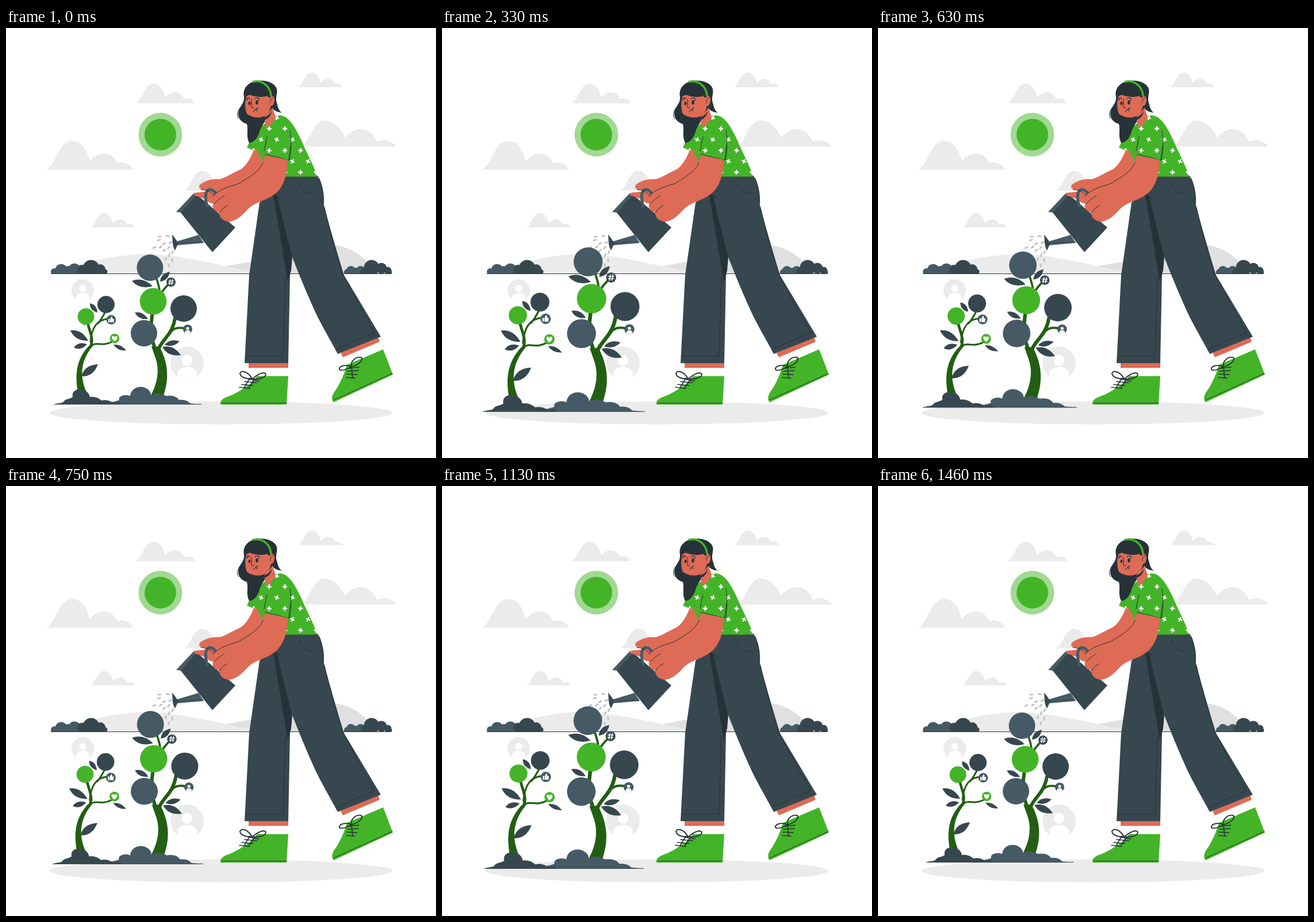
Write an HTML page with a canvas that moves like this. It is 748 px wide and 748 px high and loops after 1.5 s.

```html
<!DOCTYPE html>
<html lang="en">
<head>
<meta charset="utf-8">
<title>Watering the plants</title>
<style>
html, body { margin: 0; width: 100%; height: 100%; overflow: hidden; background: #fff; }
canvas { display: block; width: 748px; height: 748px; }
</style>
</head>
<body>
<canvas id="stage" width="748" height="748"></canvas>
<script>
const ctx = document.getElementById('stage').getContext('2d');
const GREEN = '#43b427', STEM = '#225f12', SLATE = '#37474f', BLUE = '#455a64';
const INK = '#263238', SKIN = '#de6b56', PALE = '#ebebeb', WHITE = '#fff';

function fill(d, color) {
  ctx.fillStyle = color;
  ctx.fill(new Path2D(d));
}
function line(d, color = INK, width = 1) {
  ctx.strokeStyle = color;
  ctx.lineWidth = width;
  ctx.lineCap = ctx.lineJoin = 'round';
  ctx.stroke(new Path2D(d));
}
function oval(x, y, rx, ry, color, angle = 0) {
  ctx.fillStyle = color;
  ctx.beginPath();
  ctx.ellipse(x, y, rx, ry, angle, 0, Math.PI * 2);
  ctx.fill();
}
const disc = (x, y, r, color) => oval(x, y, r, r, color);

function leaf(x1, y1, x2, y2, width) {
  const dx = x2 - x1, dy = y2 - y1, len = Math.hypot(dx, dy);
  const nx = -dy / len * width, ny = dx / len * width;
  const mx = x1 + dx * 0.45, my = y1 + dy * 0.45;
  fill(`M${x1} ${y1}Q${mx + nx} ${my + ny} ${x2} ${y2}Q${mx - nx} ${my - ny} ${x1} ${y1}Z`, SLATE);
}
function avatar(x, y, r, color) {
  ctx.save();
  disc(x, y, r, color);
  ctx.beginPath();
  ctx.arc(x, y, r, 0, Math.PI * 2);
  ctx.clip();
  disc(x, y - r * 0.17, r * 0.32, WHITE);
  oval(x, y + r * 0.65, r * 0.6, r * 0.43, WHITE);
  ctx.restore();
}
function cloud(x, y, scale) {
  ctx.save();
  ctx.translate(x, y);
  ctx.scale(scale, scale);
  fill('M0 0C17 -6 22 -50 46 -50C65 -50 72 -31 77 -15C84 -24 95 -29 104 -28C115 -27 122 -18 125 -11C135 -15 147 -11 152 0Z', PALE);
  ctx.restore();
}
function bush(color, bumps) {
  ctx.save();
  ctx.beginPath();
  ctx.rect(70, 390, 610, 37.5);
  ctx.clip();
  for (const [x, y, r] of bumps) disc(x, y, r, color);
  ctx.restore();
}

function drawBackground() {
  fill('M0 0H748V748H0Z', WHITE);
  cloud(69, 246.5, 1);
  cloud(225, 131, 0.68);
  cloud(508, 103, 0.515);
  cloud(147, 347, 0.507);
  cloud(310, 282.5, 0.68);
  fill('M514 206.5C527 201 533 161 554 161C574 161 585 181 590 191C598 180 609 175 619 176C633 177 641 188 645 198C657 192 671 196 679 206.5Z', PALE);
  disc(268.5, 185.5, 38, '#a1d993');
  disc(268.5, 185.5, 27.5, GREEN);
  fill('M320 427C400 409 455 404 492 391C532 376 564 373 590 382C614 390 629 406 650 427Z', '#e0e0e0');
  fill('M90 427C140 403 210 393 245 393C305 395 350 408 445 427Z', PALE);
  bush(BLUE, [[84, 424, 6], [96, 421, 10.5], [108, 422, 8], [119, 420, 10.5], [130, 424, 8],
    [594, 425, 6], [600, 422, 8], [609, 424, 7], [617, 422, 8], [626, 424, 6]]);
  bush(SLATE, [[132, 420, 8], [148, 418, 14.5], [164, 420, 9], [172, 424, 4.5],
    [623, 423, 6], [636, 417, 13.5], [653, 418, 9.5], [664, 422, 6.5], [668, 425, 3.5]]);
  line('M78 427.5H670');
  oval(374, 669.5, 298, 20, PALE);
  avatar(133.5, 456.5, 19.5, PALE);
  avatar(315, 583, 29, PALE);
}

function drawLegs() {
  fill('M422 580H491V591.5H422Z', SKIN);
  fill('M424 591.5H490V608H424Z', WHITE);
  fill('M491 605.5L488 655H373C372 648 377 644 389 640C404 634 412 627 424 620L437 605.5Z', GREEN);
  line('M376 652.5H488');
  fill('M582 565L647 537L650 546L586 573Z', SKIN);
  fill('M586 573L650 546L655 560L592 588Z', WHITE);
  fill('M593 586L656 559L673 603L570 651C565 646 567 638 574 629C584 613 588 602 593 586Z', GREEN);
  line('M570 647L672 601');

  fill('M484 257H542C551 271 554 289 553 308C560 336 575 387 588 430L652 537L577 567C563 540 545 511 533 483C522 458 508 425 497 396L494 430L491 583H415L423 430L441 304Z', SLATE);
  fill('M464 286L490 441L496 422L498 399C488 361 478 320 472 293Z', INK);
  line('M418 570.5H482L486 435M576 558L641 530L586 430C573 387 560 340 554 312');
  line('M510 267C512 280 524 289 537 287M545 262C550 275 552 288 551 303M466 287L482 299');

  line('M428 610C420 596 408 595 407 601C408 608 419 611 429 610C440 612 452 608 452 602C449 597 438 602 429 610', INK, 1.9);
  line('M406 625L424 627M410 620L430 622M415 615L436 617M422 611L440 614M424 609L414 626M432 611L423 625', INK, 1.7);
  line('M601 589C590 584 578 589 580 594C584 598 594 593 601 589C599 579 609 571 618 573C623 578 612 587 601 589', INK, 1.9);
  line('M592 608L607 609M593 602L611 603M594 597L613 596M595 592L614 590M601 590L603 609', INK, 1.7);
}

const shirt = new Path2D('M468 153C476 151 484 152 490 158C500 166 510 186 518 205C527 225 537 243 541 258.5H484L489 230L448 222V217H440L419 208C428 188 441 173 454 163Z');

function drawShirt() {
  ctx.save();
  ctx.fillStyle = GREEN;
  ctx.fill(shirt);
  ctx.clip(shirt);
  // Staggered plus pattern
  for (let row = 0; row < 6; row++) {
    for (let col = 0; col < 6; col++) {
      ctx.save();
      ctx.translate(403 + col * 27.2 + (row % 2 ? 0.5 : 13.6), 156 + row * 19);
      ctx.rotate(row % 2 ? 0.12 : 0.45);
      line('M-3 0H3M0 -3V3', WHITE, 2.5);
      ctx.restore();
    }
  }
  ctx.restore();
  line('M494 178C497 198 496 215 493 230L448 219M454 189L449 214M492 229L495 204');
}

function drawHead() {
  fill('M414 119C411 105 422 93 438 92C453 90 468 96 471 106C473 115 467 122 472 133C473 140 476 143 478 147C470 146 466 143 463 139L458 152C449 164 442 174 440 184C435 195 430 199 423 200C417 188 422 178 419 167C406 163 402 153 405 143C408 134 415 131 414 119Z', INK);
  line('M416 132C404 138 399 151 405 158M468 128C469 139 473 144 479 147');
  fill('M449 155L464 139L469 155C466 164 460 170 452 173Z', SKIN);
  fill('M448 156C455 154 460 149 462 144C462 151 457 157 450 160Z', INK);
  fill('M418 119C415 130 416 143 419 149C428 157 445 158 453 151C460 145 462 135 460 123L454 118C444 122 431 119 424 116Z', SKIN);
  oval(462, 127, 5, 9, SKIN, 0.15);
  line('M460 130C459 125 462 121 465 121');
  line('M430 93.5C446 90 459 101 461 117', GREEN, 3.6);
  oval(423.5, 131, 2, 3, INK, 0.1);
  oval(436.5, 130, 2.2, 3.2, INK, 0.1);
  line('M418 126L421 124M418 123C420 121 422 121 424 123M433 123C436 121 439 121 441 124M435 127L440 126', INK, 1.3);
  line('M427 124C428 130 427 135 427 138L431 139M431 145C432 142 436 141 438 139M435 142L437 144', INK, 1.1);
}

function drawCan() {
  fill('M303 320L330 288L399 347L359 390Z', SLATE);
  fill('M296 320L327 287L332 290L304 321Z', BLUE);
  fill('M335 360L298 371L297 378L344 374Z', BLUE);
  fill('M289 359L300 374L294 387C289 379 290 370 289 359Z', SLATE);
  line('M298 374L343 372', SLATE, 1);
}

function drawArms() {
  fill('M431 212C425 229 415 242 408 246C395 252 382 260 372 263C356 262 344 267 337 273C334 278 338 281 347 282L367 288L400 276C425 265 443 249 449 232V216Z', SKIN);
  drawCan();
  fill('M326 288C334 284 343 287 350 283L371 288L364 306L354 304L347 298L328 291Z', SKIN);
  line('M350 310C346 297 346 284 353 281C361 280 364 287 370 295', BLUE, 5);
  fill('M448 221L490 229C489 251 486 269 473 284C458 300 435 301 421 315C410 327 400 336 388 337C377 336 371 330 371 321C362 319 357 312 361 305C355 298 359 291 367 287C381 279 397 276 410 267C429 255 440 245 448 221Z', SKIN);
  fill('M437 215L451 217L447 233Z', GREEN);
  line('M447 234C440 251 422 260 404 271C389 276 370 280 360 293M362 306C369 300 374 294 380 292M371 322C374 316 379 312 385 309M339 281C348 282 356 284 361 291');
}

function drawDrops() {
  const drops = [[281, 362, 0.2], [266, 369, -0.3], [275, 375, -0.5], [286, 373, -0.4], [258, 382, -0.6],
    [269, 381, -0.6], [283, 382, -0.9], [275, 387, -0.8], [290, 390, -1.2], [284, 395, -1.1],
    [278, 402, -1.3], [289, 404, 1.4], [283, 413, 1.4], [267, 363, 0]];
  for (const [x, y, angle] of drops) oval(x, y, 3.6, 1.6, '#c2c2c2', angle);
}

function drawSmallTree() {
  fill('M126 638C119 603 122 577 144 553L152 552C132 575 125 603 142 638Z', STEM);
  line('M147 554C153 541 146 530 142 513', STEM, 4.5);
  line('M147 546C149 521 158 507 178 506M160 514C165 508 168 503 172 495', STEM, 3);
  line('M148 552C160 545 166 555 184 546', STEM, 3);
  leaf(112, 526, 143, 544, 12);
  leaf(118, 556, 141, 550, 9);
  leaf(146, 479, 159, 495, 8);
  leaf(187, 551, 209, 561, 7);
  leaf(131, 606, 160, 585, 13);
  disc(139, 502, 14.5, GREEN);
  disc(174, 481, 15, SLATE);
  disc(183, 507.5, 8.3, BLUE);
  fill('M178 506H180.5V512H178ZM181.3 506L183.5 502C185.5 502 185.5 504 184.8 506H188L187.3 512H181.3Z', WHITE);
  disc(189, 540, 8.3, GREEN);
  fill('M189 545C182 540 184 535 187 536Q189 537 189 538Q190 536 191 536C195 536 195 541 189 545Z', WHITE);
}

function drawTallTree() {
  fill('M252 639C266 613 266 591 260 574L253 554H267C281 580 285 608 274 639Z', STEM);
  line('M262 563C251 541 250 520 256 490', STEM, 6);
  line('M264 562C269 543 289 536 294 505', STEM, 6);
  line('M284 533C290 521 300 520 312 523', STEM, 4);
  line('M267 458C267 448 262 439 260 429M271 460C276 452 281 448 286 442', STEM, 3.6);
  leaf(219, 440, 255, 449, 12);
  leaf(268, 441, 285, 424, 9);
  leaf(224, 495, 247, 506, 9);
  leaf(276, 551, 302, 545, 9);
  leaf(272, 555, 304, 569, 12);
  disc(250.5, 417, 23, BLUE);
  disc(256, 475.5, 23.3, GREEN);
  disc(309, 488, 23, SLATE);
  disc(240, 531, 23, BLUE);
  disc(287, 442, 8, SLATE);
  line('M285.8 437.5L284.3 446.5M289.8 437.5L288.3 446.5M283 440.2H291.5M282.5 443.8H291', WHITE, 1.4);
  avatar(316, 524, 8, BLUE);
}

function drawPlants(scale) {
  ctx.save();
  ctx.translate(212, 524.5);
  ctx.scale(scale, scale);
  ctx.translate(-212, -524.5);
  drawSmallTree();
  drawTallTree();
  fill('M176 655C180 649 190 651 197 647C194 640 208 636 216 640C217 627 230 622 240 625C248 628 252 633 252 638C262 634 272 636 278 640C290 638 298 642 301 647C312 646 318 650 320 653L340 655Z', BLUE);
  fill('M84 655C92 651 98 654 101 649C104 645 110 646 116 642C114 632 122 628 130 629C140 629 145 636 146 642C155 640 163 645 166 648C175 646 183 649 187 653C194 649 200 652 203 655Z', SLATE);
  line('M84 654.5H340', SLATE, 1);
  ctx.restore();
}

// Two beats per loop, as [step, growth]; the last step holds.
const BEATS = [[0, 0], [7, 1], [21, 0], [28, 1], [35, 0], [36, 0]];
const STEPS = 36, LOOP = 1500, SWELL = 0.096;

function growth(step) {
  const i = BEATS.findIndex(([at], n) => n && step <= at);
  const [from, a] = BEATS[i - 1], [to, b] = BEATS[i];
  return a + (b - a) * (step - from) / (to - from);
}

const start = performance.now();
function frame() {
  const elapsed = (performance.now() - start) % LOOP;
  const step = Math.floor(elapsed / LOOP * STEPS);
  drawBackground();
  drawDrops();
  drawLegs();
  drawShirt();
  drawHead();
  drawArms();
  drawPlants(1 + SWELL * growth(step));
  requestAnimationFrame(frame);
}
frame();
</script>
</body>
</html>
```
